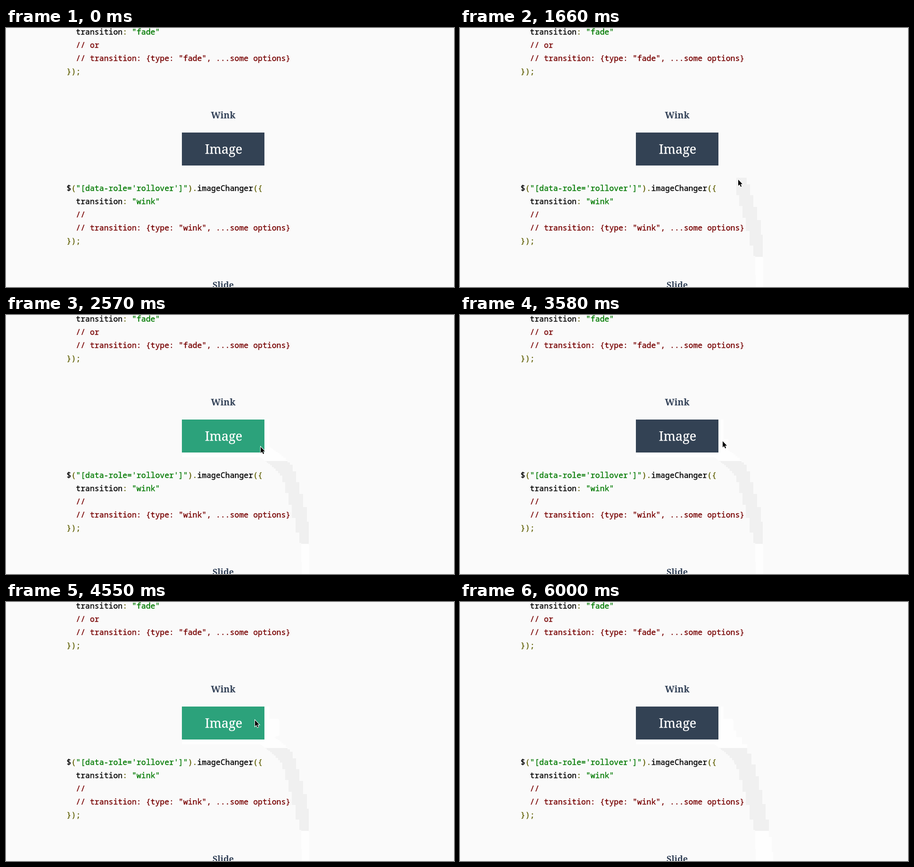
These frames come from a looping animation (950x550 px, 6.89 s). An HTML page:

```html
<!DOCTYPE html>
<html lang="en">
<head>
<meta charset="utf-8">
<title>Wink transition</title>
<style>
  html, body { margin: 0; width: 100%; height: 100%; overflow: hidden; background: #fafafa; }
  svg { display: block; width: 950px; height: 550px; }
  text { white-space: pre; }
  .code { font: 16.493px "Noto Sans Mono", monospace; font-variant-ligatures: none; stroke: #000; stroke-width: .35px; }
  .pun { fill: #5e5e00; stroke: #5e5e00; }
  .str { fill: #007a00; stroke: #007a00; }
  .com { fill: #700; stroke: #700; }
  .title { font: bold 19.2px "Noto Serif", serif; fill: #334258; text-anchor: middle; }
  .label { font: 27px "Noto Serif", serif; fill: #fff; stroke: #fff; stroke-width: .25px; text-anchor: middle; }
</style>
</head>
<body>
<svg viewBox="0 0 950 550">
  <defs>
    <linearGradient id="bands" gradientUnits="userSpaceOnUse" x1="0" y1="0" x2="0" y2="1000">
      <stop offset=".31" stop-color="#fefefe"/>
      <stop offset=".31" stop-color="#f0f0f0"/>
      <stop offset=".486" stop-color="#f0f0f0"/>
      <stop offset=".486" stop-color="#fefefe"/>
    </linearGradient>
  </defs>
  <rect width="950" height="550" fill="#fafafa"/>
  <g id="trail" fill="url(#bands)" shape-rendering="crispEdges"></g>

  <g class="code">
    <text x="148.3" y="14">transition<tspan class="pun">:</tspan> <tspan class="str">"fade"</tspan></text>
    <text x="148.3" y="42" class="com">// or</text>
    <text x="148.3" y="70" class="com">// transition: {type: "fade", ...some options}</text>
    <text x="128.5" y="98" class="pun">});</text>
    <text x="128.5" y="346">$<tspan class="pun">(</tspan><tspan class="str">"[data-role='rollover']"</tspan><tspan class="pun">).</tspan>imageChanger<tspan class="pun">({</tspan></text>
    <text x="148.3" y="374">transition<tspan class="pun">:</tspan> <tspan class="str">"wink"</tspan></text>
    <text x="148.3" y="402" class="com">//</text>
    <text x="148.3" y="430" class="com">// transition: {type: "wink", ...some options}</text>
    <text x="128.5" y="458" class="pun">});</text>
  </g>

  <text class="title" x="460.5" y="192">Wink</text>
  <text class="title" x="460.5" y="552" style="font-size:18px">Slide</text>

  <rect x="373" y="222" width="175" height="70" fill="#334254"/>
  <rect id="green" x="373" y="222" width="175" height="70" fill="#2ca27b" opacity="0"/>
  <text class="label" x="461.5" y="267">Image</text>

  <g id="cursor" visibility="hidden">
    <path d="M1 1V14L4 11.2 6.2 16.2 8.2 15.3 6 10.5H10Z" fill="#000"
      stroke="#fff" stroke-width="2" paint-order="stroke"/>
  </g>
</svg>
<script>
const LOOP = 6890, START = 840, GONE = 6000;
const STEP = 56.2, PHASE = 1660;  // the screen refreshes in steps
const WINKS = [2290, 4270];

// pointer path: time, x, y
const PATH = [
  [840, 630, 543], [1320, 629, 465], [1490, 609, 384], [1660, 589, 321],
  [2230, 550, 287], [2570, 539, 279], [2750, 537, 276], [3230, 537, 276],
  [3580, 556, 267], [3970, 567, 261], [4150, 565, 252], [4550, 527, 250],
  [5080, 527, 250], [5220, 519, 253], [5430, 574, 291], [5600, 606, 350],
  [5770, 629, 436], [6000, 651, 552]
];

const $ = id => document.getElementById(id);
const show = (el, on) => el.setAttribute("visibility", on ? "visible" : "hidden");
const swing = p => .5 - Math.cos(Math.PI * Math.min(1, Math.max(0, p))) / 2;
const stepAt = t => Math.max(START, PHASE + Math.floor((t - PHASE) / STEP) * STEP);

function slope(i, n) {
  const a = PATH[i], b = PATH[i + 1];
  return a && b ? (b[n] - a[n]) / (b[0] - a[0]) : 0;
}

// harmonic mean of neighbouring slopes: smooth, never overshoots
function tangent(i, n) {
  const a = slope(i - 1, n), b = slope(i, n);
  return a * b > 0 ? 2 * a * b / (a + b) : 0;
}

function pointAt(t) {
  const i = Math.max(0, PATH.findIndex(k => k[0] >= t) - 1);
  const a = PATH[i], b = PATH[i + 1], d = b[0] - a[0], p = (t - a[0]) / d, q = 1 - p;
  return [1, 2].map(n => Math.round(
    a[n] * q * q * (1 + 2 * p) + b[n] * p * p * (3 - 2 * p) +
    d * p * q * (q * tangent(i, n) - p * tangent(i + 1, n))));
}

// green fades in, holds briefly and fades out again
function greenAt(t) {
  return Math.max(...WINKS.map(s =>
    swing((t - s) / 200) * (1 - swing((t - s - 280) / 180))));
}

function addBox(x1, y1, x2, y2) {
  const r = document.createElementNS("http://www.w3.org/2000/svg", "rect");
  const box = { x: x1, y: y1, width: x2 - x1, height: y2 - y1, visibility: "hidden" };
  for (const k in box) r.setAttribute(k, box[k]);
  $("trail").append(r);
  return r;
}

// each refresh repaints a box around the old and the new pointer
const boxes = [[WINKS[0] + STEP, addBox(373, 222, 559, 302)]];
let [px, py] = pointAt(START);
for (let t = START; t < GONE; t = stepAt(t + STEP + .01)) {
  const [x, y] = pointAt(t);
  boxes.push([t, addBox(Math.min(x, px) - 3, Math.min(y, py) - 3,
    Math.max(x, px) + 13, Math.max(y, py) + 20)]);
  [px, py] = [x, y];
}

function draw(t) {
  const held = stepAt(t), on = t >= START && t < GONE;
  for (const [s, box] of boxes) show(box, s <= t);
  show($("cursor"), on);
  if (on) $("cursor").setAttribute("transform", `translate(${pointAt(held).join(" ")})`);
  $("green").setAttribute("opacity", greenAt(held));
}

const start = performance.now();
function tick() {
  draw((performance.now() - start) % LOOP);
  requestAnimationFrame(tick);
}
tick();
</script>
</body>
</html>
```
